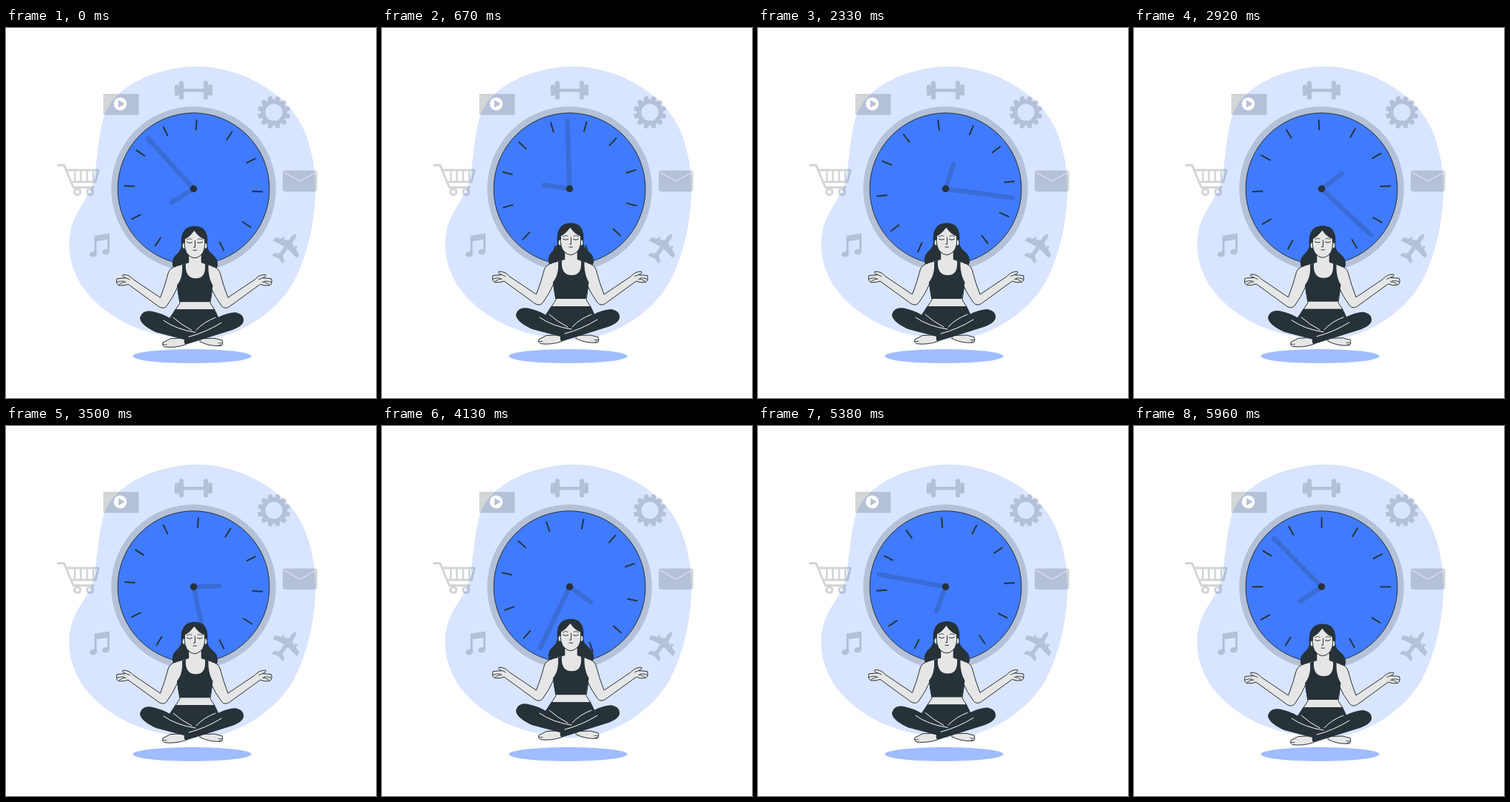
Write an HTML page that moves like this. It is 500 by 500 pixels and loops after 6000 ms.

```html
<!DOCTYPE html>
<html lang="en">
<head>
<meta charset="utf-8">
<title>Meditation clock</title>
<style>
  html, body { margin: 0; width: 100%; height: 100%; overflow: hidden; background: #fff; }
  svg { display: block; width: 100%; height: 100%; }
  .ink { fill: #263238; }
  .line { fill: none; stroke: #263238; stroke-linecap: round; stroke-linejoin: round; }
  .skin { fill: #e6e6e6; stroke: #263238; stroke-width: 1; stroke-linejoin: round; }
  .seam { fill: none; stroke: #fff; stroke-width: 1; stroke-linecap: round; }
</style>
</head>
<body>
<svg viewBox="0 0 500 500">
  <path fill="#d9e5ff" d="M258 52C310 52 363 79 390 116C411 145 419 185 418 228C416 270 405 315 386 348C363 385 320 410 290 417C262 424 250 422 215 416C170 408 130 386 105 352C88 328 82 300 87 275C92 248 111 232 118 208C124 180 123 150 133 118C148 75 210 52 258 52Z"/>
  <ellipse cx="251.500" cy="443.500" rx="80" ry="9.500" fill="#9fbdff"/>

  <!-- video -->
  <rect class="ink" opacity=".2" x="131.500" y="89" width="48" height="28.500"/>
  <circle cx="154.500" cy="102.500" r="8.700" fill="#fff"/>
  <path fill="#b5c1d7" d="M152 97.500L160.500 102.500L152 107.500Z"/>

  <!-- dumbbell -->
  <g class="ink" opacity=".2">
    <rect x="239" y="82" width="29" height="4.500"/>
    <rect x="234" y="71.500" width="6" height="25" rx="2"/>
    <rect x="267" y="71.500" width="6" height="25" rx="2"/>
    <rect x="228" y="76.500" width="6" height="15" rx="2"/>
    <rect x="273" y="76.500" width="6" height="15" rx="2"/>
  </g>

  <!-- gear -->
  <g id="gear" opacity=".2" transform="translate(362 114) rotate(15)">
    <circle r="14.500" class="line" stroke-width="6"/>
  </g>

  <!-- envelope -->
  <rect class="ink" opacity=".2" x="374" y="192.500" width="46.500" height="28.500" rx="3"/>
  <path d="M375.500 195L397.500 207L419 195" fill="none" stroke="#e6edfb" stroke-width="1"/>

  <!-- plane -->
  <path class="ink" opacity=".2" transform="translate(379 296) rotate(36)" d="M0 -22Q3 -19 3 -13V-9L9 -6V-9H12V-5L20 -2V4L3 1L2.500 12L9 17V21L0 18.500L-9 21V17L-2.500 12L-3 1L-20 4V-2L-12 -5V-9H-9V-6L-3 -9V-13Q-3 -19 0 -22Z"/>

  <!-- music -->
  <g class="ink" opacity=".2">
    <path d="M119.500 280.500L140 277.500V302H137V286L122.500 288V305H119.500Z"/>
    <ellipse cx="118" cy="305.500" rx="5" ry="3.800" transform="rotate(-12 118 305.500)"/>
    <ellipse cx="135" cy="302.500" rx="5" ry="3.800" transform="rotate(-12 135 302.500)"/>
  </g>

  <!-- cart -->
  <g class="line" opacity=".2" stroke-width="3">
    <path d="M70 185.500H78.500L91 215.500H118"/>
    <path d="M82 192H125L121 208H88"/>
    <path d="M93 192V208M101 192V208M109.500 192V208M118 192V208" stroke-width="2.500"/>
    <circle cx="96.500" cy="221.500" r="4"/>
    <circle cx="113.500" cy="221.500" r="4"/>
  </g>

  <!-- clock -->
  <g transform="translate(253.500 217.300)">
    <circle class="ink" opacity=".2" r="111.300"/>
    <circle r="102.500" fill="#407bff" stroke="#263238" stroke-width="1"/>
    <g id="dial">
      <g id="ticks" transform="rotate(2.400)" class="line" stroke-width="1.900"></g>
      <g class="line" opacity=".2" stroke-width="6.500">
        <path d="M0 0V-91.500" transform="rotate(317.800)"/>
        <path d="M0 0V-35" transform="rotate(238)"/>
      </g>
    </g>
    <circle class="ink" r="4.700"/>
  </g>

  <g id="woman">
    <path class="ink" d="M237 290C238 306 224 303 225 319Q225 325 232 326H280Q287 324 286 318C286 304 271 306 272 290Z"/>
    <path class="skin" d="M247 305V316Q237 319 228 322L219 332L232 350L235 371L229 380H282L276 371L279 350L290 332L282 322Q273 319 264 316V305Z"/>
    <g id="arm">
      <path class="skin" d="M231 321Q221 323 219 331Q215 347 208.500 363.500L172 339Q167 332.500 158 332.500Q156 335 162 337Q154 337.500 150 338Q148 344 152 347Q160 348 165 345.500L207 376Q213 379.500 217 375Q226 363 232 349L236 325Z"/>
      <path fill="#e6e6e6" d="M230 321.500L240 319V345L230 349Z"/>
      <path class="line" d="M150 342.500Q156 340.500 160 341.500M153 345.500Q158 342.500 162 342.500M162 337L167 339" stroke-width=".9"/>
    </g>
    <use href="#arm" transform="translate(508.500 0) scale(-1 1)"/>
    <path class="ink" d="M238 319.500L243 317.500C242 330 246 337.500 256.500 337.500S270 330 269 317.500L273.500 319.500C273 332 276 341 279.500 347Q278 359 275.500 369.500H234.500Q232 359 231 347C236 341 239 332 238 319.500Z"/>
    <path fill="#e6e6e6" d="M247.500 304V318H263.500V304Z"/>

    <!-- head -->
    <path class="ink" d="M237 294C235 277 241 267 255 267S274 277 272 294Q270 303 264 306H245Q239 303 237 294Z"/>
    <ellipse class="skin" cx="240.500" cy="293.500" rx="2.500" ry="4"/>
    <ellipse class="skin" cx="269.500" cy="293.500" rx="2.500" ry="4"/>
    <path class="skin" d="M254.500 272.500Q248 281.500 241.500 284.500Q240 300.500 247 306.500Q255 313.500 263 306.500Q270 300.500 268.500 284.500Q260 281.500 254.500 272.500Z"/>
    <g class="line" stroke-width="1">
      <path d="M244.500 288.500Q248 291 251.500 289M258.500 289Q262 291 265.500 288.500"/>
      <path d="M244.500 285Q248 283 251 284.500M259 284.500Q262 283 265.500 285" stroke-width=".8"/>
      <path d="M255.500 286.500V295.500H253.500M253 299.500H257.500"/>
    </g>

    <!-- feet and legs -->
    <path class="skin" d="M243 418L222 419Q217 422 212 424Q210 428 214 430Q228 432 243 427Z"/>
    <path class="skin" d="M262 419L282 418.500Q287 420 292 421Q294 426 291 428.500Q276 430 262 423Z"/>
    <path class="line" d="M212 427L217 427M287 425L292 425M288 428L291 427" stroke-width=".8"/>
    <path class="ink" d="M228.500 379.500H282Q285 385 287 390Q300 383.500 310 383.500Q322 386 321 395.500Q319 403.500 302 408.500L267 419.500L243 427Q240 425.500 241 420.500L203 410.500Q181 400.500 181 390.500Q184 380 197 382Q211 385 221 391Q225 385 228.500 379.500Z"/>
    <path class="seam" d="M213 394.500Q230 406.500 256 410.500M226 390.500Q237 400.500 251 407.500M283 390.500Q267 396.500 257 407.500M247 416.500Q270 410.500 291 397.500"/>
  </g>
</svg>
<script>
  const LOOP = 6000, BOB = 3000, LIFT = 9.5, REST = 0.8;
  const byId = id => document.getElementById(id);

  // Repeats one small path around a centre.
  function ring(parent, count, d, { first = 0, fill = false } = {}) {
    for (let i = 0; i < count; i++) {
      const p = document.createElementNS('http://www.w3.org/2000/svg', 'path');
      p.setAttribute('d', d);
      p.setAttribute('transform', `rotate(${first + i * 360 / count})`);
      if (fill) p.setAttribute('class', 'ink');
      parent.append(p);
    }
  }
  // The marks between the quarter hours sit slightly ahead.
  for (const first of [0, 31.5, 61.5]) ring(byId('ticks'), 4, 'M0 -80V-93', { first });
  ring(byId('gear'), 12, 'M-3.6 -16.5L-2.8 -22H2.8L3.6 -16.5Z', { fill: true });

  const dial = byId('dial'), woman = byId('woman');

  function draw(now) {
    const t = now % LOOP;
    const phase = (t % BOB) / BOB;
    const rise = LIFT * (1 - Math.abs(1 - 2 * phase));
    dial.setAttribute('transform', `rotate(${360 * t / LOOP})`);
    woman.setAttribute('transform', `translate(0 ${REST - rise})`);
  }

  const start = performance.now();
  function frame() {
    draw(performance.now() - start);
    requestAnimationFrame(frame);
  }
  frame();
</script>
</body>
</html>
```
